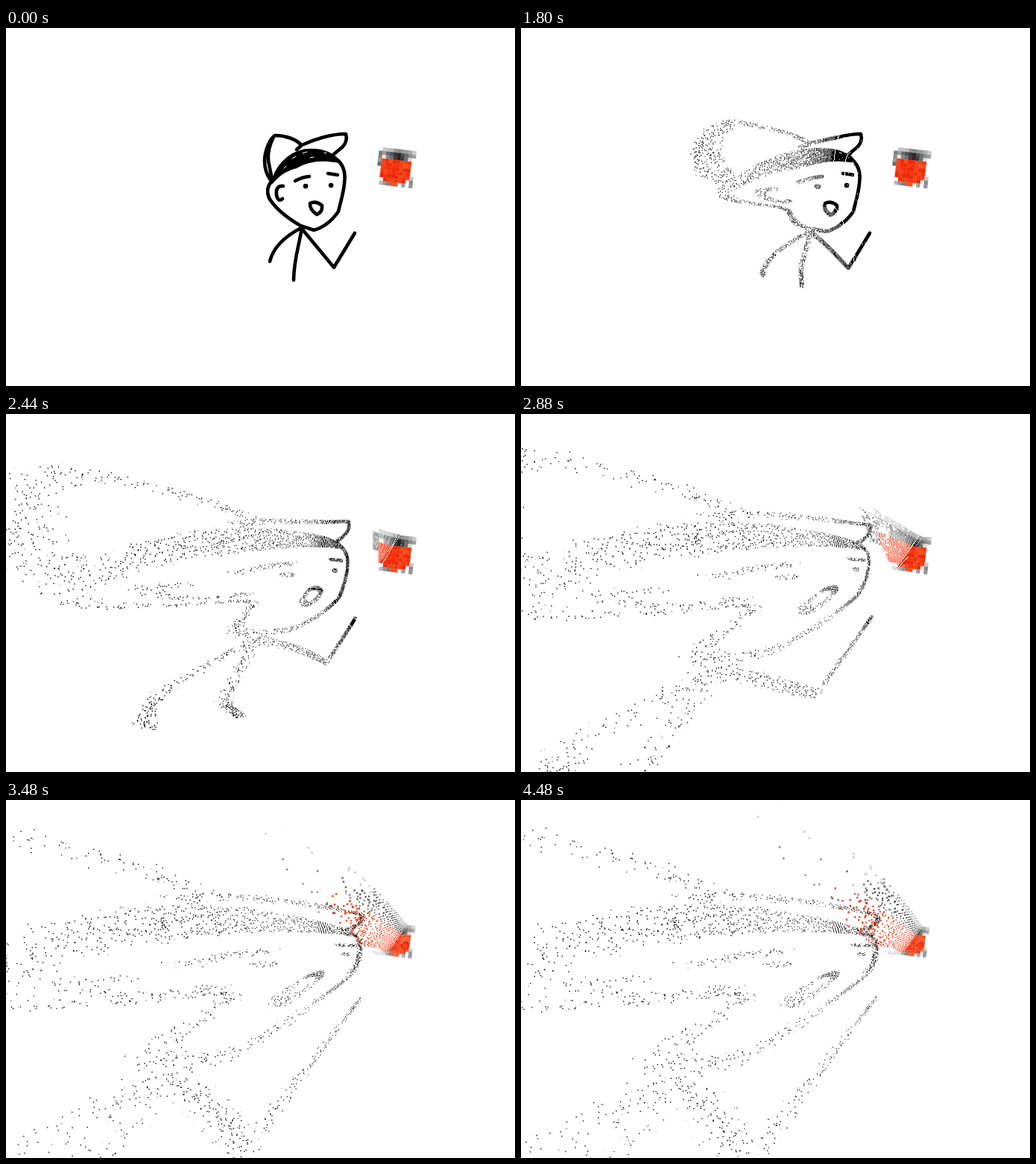
Write an HTML page with a canvas that moves like this. It is 683x480 px and loops after 4.52 s.

```html
<!DOCTYPE html>
<html>
<head>
<meta charset="utf-8">
<style>
html, body { margin: 0; width: 100%; height: 100%; overflow: hidden; background: #fff; }
canvas { display: block; }
</style>
</head>
<body>
<canvas id="stage" width="683" height="480"></canvas>
<script>
const W = 683, H = 480, LOOP = 4520, HOLD = 520, STEP = 40;
const ctx = document.getElementById('stage').getContext('2d');

let seed = 7;
const rand = () => (seed = (seed * 16807) % 2147483647) / 2147483647;

const hat = 'M396 157C390 149 374 144 361 144C355 147 347 164 347 178C347 190 350 197 355 204'
  + 'M359 146C353 158 351 168 352 178L357 203M390 163L397 157C414 149 437 142 456 142Q459 152 451 160L440 169';
const face = 'M357 205C350 212 350 221 353 228C362 243 378 255 395 265L413 271C428 267 439 256 446 246'
  + 'C448 236 453 222 454 208C456 195 453 185 446 178M372 212C364 211 362 217 363 224Q365 234 371 229'
  + 'M388 205Q397 200 407 199M432 195L445 197M408 235Q407 243 417 250Q425 247 424 238Q416 231 408 235Z';
const body = 'M397 267C394 290 386 310 386 338M354 313Q360 287 396 268L440 321L468 275';
const eyes = 'M402 212h.1M436 211h.1';
const hair = 'M357 208C360 187 378 167 402 163C424 161 439 167 449 180L431 178C412 177 400 181 390 187C374 191 366 198 357 208Z';
const shine = 'M384 175l5 -3M398 168l6 -2M408 174l5 -1M427 167l3 1M373 188l3 -3';

function drawFigure(c) {
  const ink = (path, width) => { c.lineWidth = width; c.stroke(new Path2D(path)); };
  c.lineCap = c.lineJoin = 'round';
  ink(hat + face + body, 4.6);
  ink(eyes, 6.5);
  ink(hair, 2);
  c.fill(new Path2D(hair));
  c.globalCompositeOperation = 'destination-out';
  ink(shine, 1);
}

// A coarse mosaic: red disc, dark cap, scattered grey cells around it.
function drawGem(c) {
  const cell = 5;
  c.translate(523, 187);
  c.rotate(0.12);
  for (let y = -22.5; y < 25; y += cell) {
    for (let x = -22.5; x < 25; x += cell) {
      const tone = rand();
      if (y < -10 && Math.abs(x) < -y + 3) {
        const grey = 30 + 5 * Math.abs(x - 2) + 50 * tone + (y < -20 ? 60 : 0);
        c.fillStyle = `rgb(${grey},${grey},${grey})`;
      } else if (Math.hypot(x, y - 2) < 21) {
        c.fillStyle = `hsl(${8 + 5 * tone},92%,${47 + 8 * tone}%)`;
      } else if (tone < 0.5) {
        c.fillStyle = `hsl(0,0%,${30 + 120 * tone}%)`;
      } else continue;
      c.fillRect(x - cell / 2, y - cell / 2, cell + 0.3, cell + 0.3);
    }
  }
}

// Near points are drawn in, far ones are thrown out along the same ray.
function figureShift(x, y) {
  const ox = x - 542, oy = y - 190, r = Math.hypot(ox, oy);
  const angle = Math.atan2(oy, -ox);
  const calm = 1 - 0.75 * Math.exp(-(((angle - 0.28) / 0.12) ** 2));
  const push = 0.055 * Math.min(100, Math.max(0, r - 95)) ** 2 * calm;
  const gain = push / r - 0.25;
  return [ox * gain, oy * gain];
}

// The upper left side is swept away, the rest gathers at a point.
function gemShift(x, y) {
  const ox = x - 535, oy = y - 195, r = Math.hypot(ox, oy);
  const lead = -0.8 * ox - 0.6 * oy;
  const push = 0.9 * Math.max(0, lead - 15) ** 1.6;
  const dx = ox - 0.4 * r, dy = oy - 0.3 * r, d = Math.hypot(dx, dy) || 1;
  return [push * dx / d - 0.2 * ox, push * dy / d - 0.2 * oy];
}

function collect({ draw, shift, ...style }) {
  const layer = document.createElement('canvas');
  layer.width = W;
  layer.height = H;
  const c = layer.getContext('2d');
  draw(c);
  const { data } = c.getImageData(0, 0, W, H), dots = [];
  for (let y = 0; y < H; y++) for (let x = 0; x < W; x++) {
    const [r, g, b, a] = data.subarray((y * W + x) * 4);
    if (a < 20) continue;
    const [dx, dy] = shift(x, y), reach = Math.hypot(dx, dy);
    const jitter = amount => (rand() - 0.5) * amount;
    dots.push({
      x, y, dx, dy, style,
      color: `rgba(${r},${g},${b},${a / 255})`,
      center: 2200 + 6 * (x - 350) + 3.3 * Math.max(0, y - 210),
      spread: 300 - 0.5 * (x - 350),
      jx: dx * jitter(0.3) + jitter(reach * 0.04),
      jy: dy * jitter(0.3) * 0 + jitter(reach * 0.04),
      luck: rand()
    });
  }
  return dots;
}

const dots = [
  { draw: drawFigure, shift: figureShift, thin: 0.5, thinBy: 20, grow: 400, maxSize: 1.4 },
  { draw: drawGem, shift: gemShift, thin: 0.9, thinBy: 110, grow: 45, maxSize: 2.5 }
].flatMap(collect);

function render(t) {
  ctx.fillStyle = '#fff';
  ctx.fillRect(0, 0, W, H);
  for (const p of dots) {
    const h = t < HOLD ? 0 : 1 / (1 + Math.exp((p.center - t) / p.spread));
    const mx = p.dx * h + p.jx * h * h, my = p.dy * h + p.jy * h * h;
    const moved = Math.hypot(mx, my), { thin, thinBy, grow, maxSize } = p.style;
    if (p.luck < Math.min(thin, moved / thinBy)) continue;
    const size = Math.min(maxSize, 1 + moved / grow);
    const snap = moved < 1 ? Math.round : v => v;
    ctx.fillStyle = p.color;
    ctx.fillRect(p.x + snap(mx), p.y + snap(my), size, size);
  }
}

let start, shown = -1;
function tick(now) {
  start ??= now;
  const t = Math.floor(((now - start) % LOOP) / STEP) * STEP;
  if (t !== shown) render(shown = t);
  requestAnimationFrame(tick);
}
requestAnimationFrame(tick);
</script>
</body>
</html>
```
